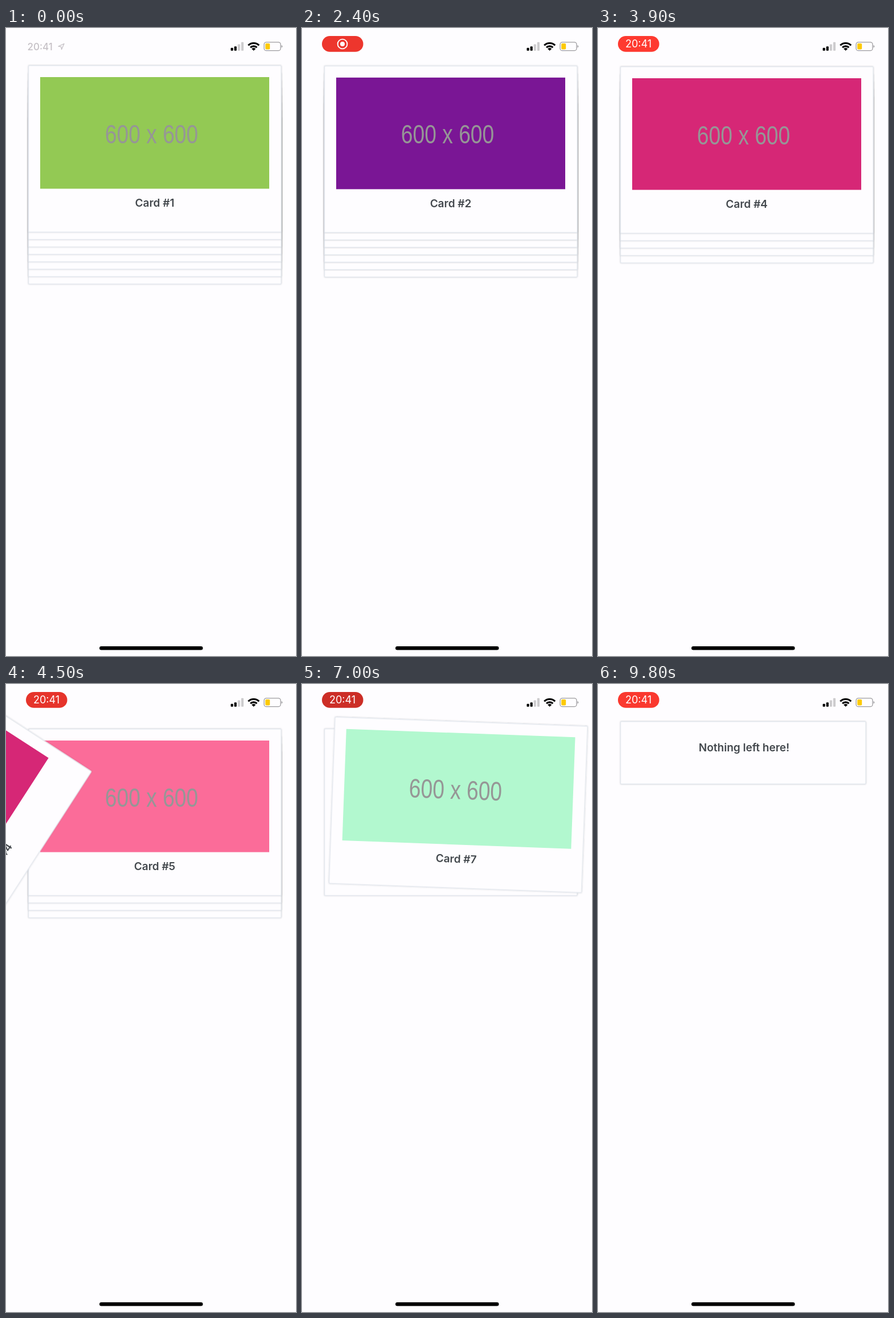
Animation, 509 px wide and 1100 px high, one loop 9900 ms. Source, as an HTML page:

```html
<!DOCTYPE html>
<html lang="en">
<head>
<meta charset="utf-8">
<title>Swipe deck</title>
<style>
  html, body { margin: 0; width: 100%; height: 100%; overflow: hidden; background: #fefdff; }
  svg { display: block; width: 100vw; height: 100vh; }
  text { font-family: Inter, Roboto, sans-serif; }
  .title { font-size: 19px; font-weight: 600; fill: #43484d; text-anchor: middle; }
  .size { font-family: "Liberation Sans", Arial, sans-serif; font-size: 46.5px; fill: #969696; text-anchor: middle; }
  .frame { fill: #fefdff; stroke: #e3e7ed; stroke-width: 1.5; }
</style>
</head>
<body>
<svg viewBox="0 0 509 1100" preserveAspectRatio="none">
  <defs>
    <filter id="shadow" filterUnits="userSpaceOnUse" x="30" y="56" width="462" height="310">
      <feDropShadow dx="0" dy="0" stdDeviation="0.8" flood-color="#000" flood-opacity="0.2"/>
    </filter>
  </defs>
  <rect width="509" height="1100" fill="#fefdff"/>
  <g id="empty">
    <rect class="frame" x="39.5" y="65.7" width="430.5" height="109.5" rx="1.5" filter="url(#shadow)"/>
    <text class="title" x="256.5" y="117.5">Nothing left here!</text>
  </g>
  <g id="deck"></g>

  <g id="plain" fill="#8d858d">
    <text x="37.5" y="38.5" font-size="17" font-weight="500">20:41</text>
    <path d="M102 27.5L92 32.2L96.8 32.8L97.5 37.5Z" fill="none" stroke="#8d858d" stroke-width="1.3" stroke-linejoin="round"/>
  </g>
  <g id="pill">
    <rect id="pillBack" x="35" y="14" width="72.5" height="27.8" rx="13.9"/>
    <g id="record">
      <circle cx="71" cy="28" r="8.4" fill="none" stroke="#fff" stroke-width="1.9"/>
      <circle cx="71" cy="28" r="4" fill="#fff"/>
    </g>
    <text id="clock" x="71" y="34.3" font-size="18" fill="#fff" text-anchor="middle">20:41</text>
  </g>

  <rect x="394.5" y="34.8" width="4.2" height="5" rx="1"/>
  <rect x="400.6" y="32.2" width="4.2" height="7.6" rx="1"/>
  <g fill="#cdccce">
    <rect x="406.7" y="28.5" width="4.2" height="11.3" rx="1"/>
    <rect x="412.8" y="24.8" width="4.2" height="15" rx="1"/>
  </g>
  <g fill="none" stroke="#000" stroke-width="3.1">
    <path d="M425.2 30.3A13.6 13.6 0 0 1 444.2 30.3"/>
    <path d="M429 34.2A8.2 8.2 0 0 1 440.4 34.2"/>
  </g>
  <path d="M434.7 39.8L431.2 36.4A5 5 0 0 1 438.2 36.4Z"/>
  <rect x="453" y="24.9" width="29" height="14.8" rx="4" fill="none" stroke="#9c9b9e" stroke-width="1.3"/>
  <rect x="455.2" y="27" width="8" height="10.6" rx="1.8" fill="#fdca02"/>
  <path d="M483.5 30Q485.2 30.6 485.2 32.3T483.5 34.6Z" fill="#9c9b9e"/>
  <rect x="164" y="1083" width="181.5" height="6.6" rx="3.3"/>
</svg>
<script>
const LOOP = 9900, STEP = 100, FLING = 250;
const WIDTH = 509, GAP = 13, TURN = 0.161;
const CENTER = { x: 261, y: 211.5 };
const $ = id => document.getElementById(id);

// Drag start, release, and finger offset at release for each card
const swipes = [
  { color: '#93c954', start: 1590, release: 1770, x: 207, y: -4 },
  { color: '#7a1695', start: 2540, release: 2700, x: -207, y: 100 },
  { color: '#4f9fae', start: 3390, release: 3548, x: 207, y: -3 },
  { color: '#d62776', start: 4220, release: 4377, x: -207, y: 95 },
  { color: '#fb6c99', start: 5120, release: 5280, x: 207, y: -8 },
  { color: '#58a8c4', start: 5945, release: 6100, x: -207, y: 106 },
  { color: '#b2f8cf', start: 6920, release: 7370, x: 207, y: 0 },
  { color: '#55156f', start: 8340, release: 8500, x: -207, y: 100 }
];

const cardMarkup = (color, n) => `
  <rect class="frame" x="39.5" y="65.7" width="443.5" height="291.8" rx="1.5" filter="url(#shadow)"/>
  <rect x="60" y="86" width="402" height="195.5" fill="${color}"/>
  <text class="size" transform="translate(255.5 201.5) scale(.8 1)">600 x 600</text>
  <text class="title" x="261" y="313">Card #${n}</text>`;

// Later cards lie underneath, so each one goes in before the previous
const cards = swipes.map(({ color }, i) => {
  const g = document.createElementNS('http://www.w3.org/2000/svg', 'g');
  g.innerHTML = cardMarkup(color, i + 1);
  $('deck').prepend(g);
  return g;
});

const clamp = v => Math.min(1, Math.max(0, v));
const smooth = u => u * u * (3 - 2 * u);
const show = (el, on) => el.setAttribute('display', on ? 'inline' : 'none');
const fade = (el, alpha) => el.setAttribute('opacity', alpha);

// Underdamped settle from 1 to 0, damping ratio 0.4
function spring(ms) {
  const s = ms / 1000, decay = 7.2, freq = 16.5;
  return Math.exp(-decay * s) * (Math.cos(freq * s) + decay / freq * Math.sin(freq * s));
}

function offset(card, t) {
  if (t < card.release) {
    const p = clamp((t - card.start) / (card.release - card.start)) ** 1.6;
    return { x: card.x * p, y: card.y * p };
  }
  const p = smooth(clamp((t - card.release) / FLING));
  const end = Math.sign(card.x) * WIDTH;
  return { x: card.x + (end - card.x) * p, y: card.y * (1 - p) };
}

function drawDeck(t) {
  const gone = swipes.filter(s => t >= s.release + FLING).length;
  const lift = gone ? GAP * spring(t - swipes[gone - 1].release - FLING) : 0;
  cards.forEach((g, i) => {
    show(g, i >= gone);
    if (i < gone) return;
    const top = (i - gone) * GAP + lift;
    const d = i === gone ? offset(swipes[i], t) : { x: 0, y: 0 };
    g.setAttribute('transform',
      `translate(${d.x} ${d.y + top}) rotate(${d.x * TURN} ${CENTER.x} ${CENTER.y})`);
  });
  show($('empty'), gone === cards.length);
}

function drawStatus(t) {
  const shown = clamp((t - 50) / 350);
  const toClock = clamp((t - 2800) / 300);
  const glow = 0.9 + 0.1 * Math.cos(t * Math.PI / 1000);
  fade($('plain'), 0.5 * (1 - shown));
  fade($('pill'), shown);
  fade($('record'), 1 - toClock);
  fade($('clock'), toClock);
  $('pillBack').setAttribute('fill', `rgb(${[255, 58, 48].map(c => Math.round(c * glow))})`);
}

function draw(now) {
  const t = Math.floor(now % LOOP / STEP) * STEP;
  drawDeck(t);
  drawStatus(t);
}

const begin = performance.now();
function tick() {
  draw(performance.now() - begin);
  requestAnimationFrame(tick);
}
tick();
</script>
</body>
</html>
```
